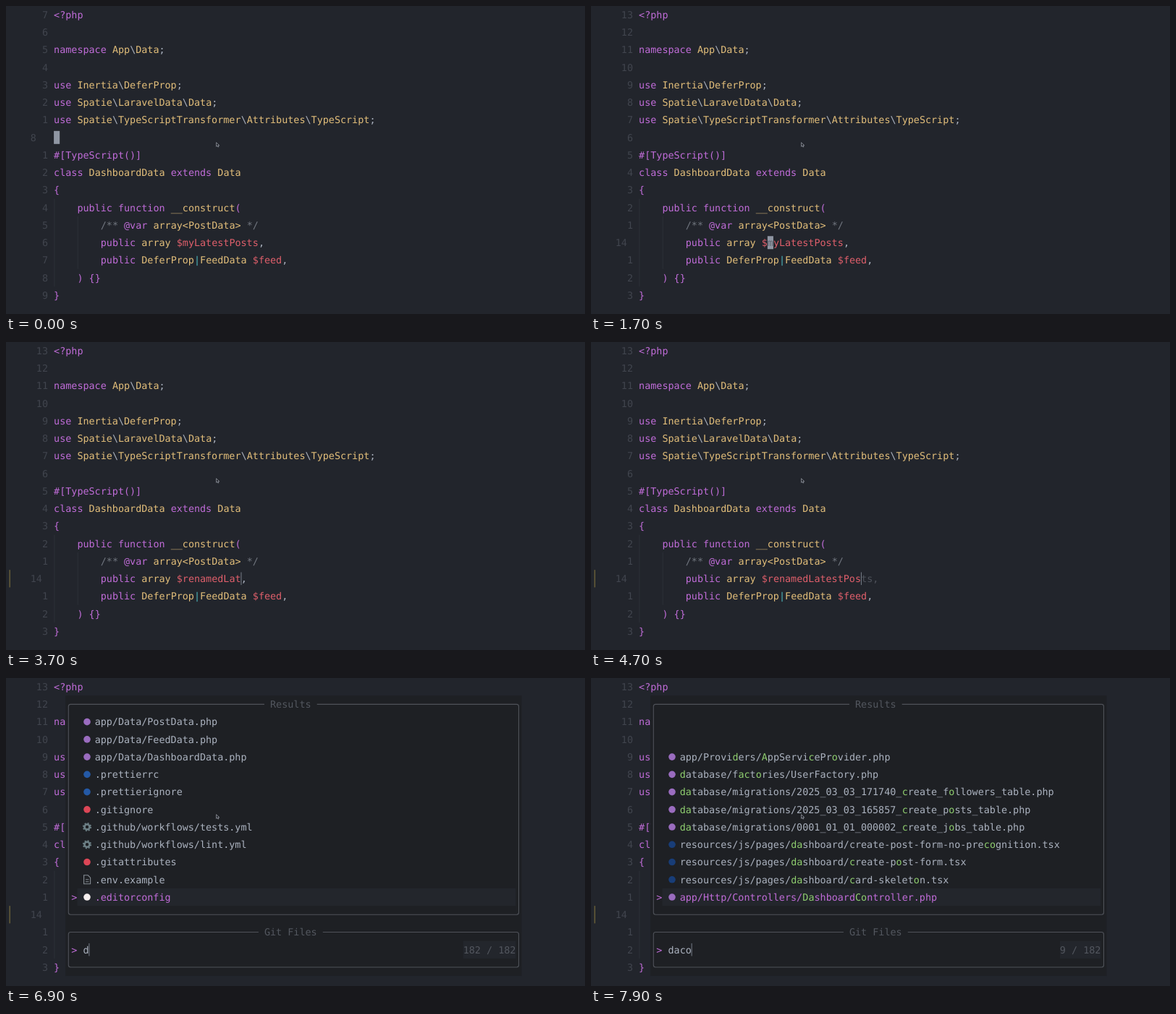
These frames come from a looping animation (800x426 px, 8000 ms). An HTML page:

```html
<!DOCTYPE html>
<html lang="en">
<head>
<meta charset="utf-8">
<title>Renaming a property</title>
<style>
  html, body { margin: 0; width: 100%; height: 100%; overflow: hidden; background: #22252c; }
  svg { display: block; width: 800px; height: 426px; }
  text {
    font: 13.42px "DejaVu Sans Mono", "Noto Sans Mono", monospace;
    white-space: pre;
    text-rendering: geometricPrecision;
  }
</style>
</head>
<body>
<svg id="stage" viewBox="0 0 800 426"></svg>
<script>
const LOOP = 8000, CW = 8.08, RH = 24.24, LEFT = 66.1, MID = 12.15;
const C = {
  p: '#c06cd8', y: '#e2be7a', w: '#abb2bf', r: '#df5f6b', g: '#71767f', c: '#4db5bd',
  num: '#41454e', ghost: '#4e525b', block: '#8f96a3', under: '#5d626d',
  guide: '#2d3138', pop: '#1e2024', sel: '#23262c', line: '#4f5259', title: '#53575f', hit: '#8fce6f'
};

// Each line: indent, then colour/text pairs
const CODE = [
  [0, 'p', '<?php'],
  [0],
  [0, 'p', 'namespace ', 'y', 'App', 'w', '\\', 'y', 'Data', 'w', ';'],
  [0],
  [0, 'p', 'use ', 'y', 'Inertia', 'w', '\\', 'y', 'DeferProp', 'w', ';'],
  [0, 'p', 'use ', 'y', 'Spatie', 'w', '\\', 'y', 'LaravelData', 'w', '\\', 'y', 'Data', 'w', ';'],
  [0, 'p', 'use ', 'y', 'Spatie', 'w', '\\', 'y', 'TypeScriptTransformer', 'w', '\\',
    'y', 'Attributes', 'w', '\\', 'y', 'TypeScript', 'w', ';'],
  [0],
  [0, 'p', '#[TypeScript()]'],
  [0, 'p', 'class ', 'y', 'DashboardData ', 'p', 'extends ', 'y', 'Data'],
  [0, 'p', '{'],
  [4, 'p', 'public function ', 'y', '__construct', 'p', '('],
  [8, 'g', '/** ', 'p', '@var ', 'y', 'array<PostData> ', 'g', '*/'],
  null,
  [8, 'p', 'public ', 'y', 'DeferProp', 'c', '|', 'y', 'FeedData ', 'r', '$feed', 'w', ','],
  [4, 'p', ') {}'],
  [0, 'p', '}']
];
const EDIT_ROW = 13, NAME_COL = 22;
const OLD_NAME = 'myLatestPosts', NEW_NAME = 'renamedLatestPosts';

// Time, row, column of the block cursor before the edit
const MOVES = [[0, 7, 0], [500, 13, 0], [1000, 13, 8], [1200, 13, 15], [1400, 13, 21], [1600, 13, 22]];
const T = { cut: 2000, sign: 2300, type: 2130, key: 155, ghost: 4650, esc: 5200, blame: 5700, popup: 6500, filter: 7300 };
const QUERY = [[6800, 'd'], [7100, 'da'], [7300, 'dac'], [7500, 'daco']];

// Icon and path; brackets mark matched letters
const ALL_FILES = [
  ['php', 'app/Data/PostData.php'], ['php', 'app/Data/FeedData.php'], ['php', 'app/Data/DashboardData.php'],
  ['fmt', '.prettierrc'], ['fmt', '.prettierignore'], ['git', '.gitignore'],
  ['gear', '.github/workflows/tests.yml'], ['gear', '.github/workflows/lint.yml'],
  ['git', '.gitattributes'], ['doc', '.env.example'], ['cfg', '.editorconfig']
];
const FOUND = [
  ['php', 'app/Provi[d]ers/[A]ppServi[c]ePr[o]vider.php'],
  ['php', '[d]atabase/f[ac]t[o]ries/UserFactory.php'],
  ['php', '[da]tabase/migrations/2025_03_03_171740_[c]reate_f[o]llowers_table.php'],
  ['php', '[da]tabase/migrations/2025_03_03_165857_[c]reate_p[o]sts_table.php'],
  ['php', '[da]tabase/migrations/0001_01_01_000002_[c]reate_j[o]bs_table.php'],
  ['tsx', 'resources/js/pages/[da]shboard/create-post-form-no-pre[co]gnition.tsx'],
  ['tsx', 'resources/js/pages/[da]shboard/[c]reate-p[o]st-form.tsx'],
  ['tsx', 'resources/js/pages/[da]shboard/[c]ard-skelet[o]n.tsx'],
  ['php', 'app/Http/Controllers/[Da]shboard[Co]ntroller.php']
];
const DOTS = { php: '#9a6cbf', fmt: '#2459a6', git: '#dc4656', cfg: '#f5eeee', tsx: '#183d78' };

const X = col => LEFT + col * CW;
const Y = row => MID + row * RH;
const esc = s => s.replace(/&/g, '&amp;').replace(/</g, '&lt;').replace(/>/g, '&gt;');
const rect = (x, y, w, h, fill) => `<rect x="${x}" y="${y}" width="${w}" height="${h}" fill="${fill}"/>`;
const path = (d, stroke, width = 1.1) => `<path d="${d}" fill="none" stroke="${stroke}" stroke-width="${width}"/>`;
const last = (table, t) => table.filter(e => e[0] <= t).pop();

// Words are placed one by one on the character grid
function write(row, col, str, color) {
  let out = '';
  for (const m of str.matchAll(/\S+/g))
    out += `<text x="${X(col + m.index).toFixed(2)}" y="${(Y(row) + 4.8).toFixed(2)}" fill="${color}">${esc(m[0])}</text>`;
  return out;
}

function writeRuns(row, [col, ...runs]) {
  let out = '';
  for (let i = 0; i < runs.length; i += 2) {
    out += write(row, col, runs[i + 1], C[runs[i]]);
    col += runs[i + 1].length;
  }
  return out;
}

const block = (row, col) => rect(X(col), Y(row) - 9, CW, 18, C.block);
const bar = (row, col) => rect(X(col) - 0.2, Y(row) - 8.8, 1, 17.6, '#777d88');

function editLine(s) {
  const head = [8, 'p', 'public ', 'y', 'array ', 'r', '$' + s.name];
  const end = NAME_COL + s.name.length;
  let out = writeRuns(EDIT_ROW, head);
  out += s.ghost ? write(EDIT_ROW, end, NEW_NAME.slice(s.name.length) + ',', C.ghost)
                 : write(EDIT_ROW, end, ',', C.w);
  if (s.blame) out += write(EDIT_ROW, 43, 'Not Committed Yet', C.ghost);
  return out;
}

function editor(s) {
  let out = path(`M${X(0) + .8} ${Y(10.5)}V${Y(15.5)}M${X(4) + .8} ${Y(11.5)}V${Y(14.5)}`, C.guide, 1);
  CODE.forEach((line, row) => {
    const n = Math.abs(row - s.row);
    const label = String(n || row + 1);
    out += write(row, n ? -1 - label.length : -4, label, C.num);
    out += line ? writeRuns(row, line) : editLine(s);
  });
  if (s.sign) out += rect(4.6, Y(12.5), 1.1, RH, '#80713c');
  if (s.insert) return out + bar(s.row, s.col);
  out += block(s.row, s.col);
  const text = '        public array $' + s.name;
  if (s.row === EDIT_ROW) out += write(s.row, s.col, text[s.col] || ' ', C.under);
  return out;
}

function icon(kind, row) {
  const x = 112, y = Y(row);
  if (DOTS[kind]) return `<circle cx="${x}" cy="${y}" r="4.8" fill="${DOTS[kind]}"/>`;
  if (kind === 'gear')
    return `<circle cx="${x}" cy="${y}" r="3.5" fill="none" stroke="#6d8086" stroke-width="2.6"/>` +
      `<circle cx="${x}" cy="${y}" r="5.2" fill="none" stroke="#6d8086" stroke-width="1.8" stroke-dasharray="2.04"/>`;
  return path(`M${x - 4.4} ${y - 6}h5.6l3.4 3.4v8.6h-9zM${x - 2} ${y}h4.4M${x - 2} ${y + 3}h4.4`, '#858b93');
}

function frame(top, bottom, title, col) {
  const l = X(2.5), r = X(79.5), t = Y(top), b = Y(bottom), q = 3;
  return path(`M${X(col - 1)} ${t}H${l + q}q${-q} 0 ${-q} ${q}V${b - q}q0 ${q} ${q} ${q}H${r - q}` +
    `q${q} 0 ${q} ${-q}V${t + q}q0 ${-q} ${-q} ${-q}H${X(col + title.length + 1)}`, C.line) +
    write(top, col, title, C.title);
}

function fileRow([kind, marked], row) {
  const base = row === 12 ? C.p : C.w;
  let col = 7, out = icon(kind, row);
  marked.split(/[\[\]]/).forEach((part, i) => {
    out += write(row, col, part, i % 2 ? C.hit : base);
    col += part.length;
  });
  return out;
}

function popup(s) {
  const files = s.filtered ? FOUND : ALL_FILES;
  const count = (s.filtered ? '9' : '182') + ' / 182';
  return rect(X(2), Y(.5), 78 * CW, 16 * RH, C.pop) +
    rect(X(4), Y(11.5), 75 * CW, RH, C.sel) +
    rect(X(79 - count.length), Y(14.5), count.length * CW, RH, C.sel) +
    frame(1, 13, 'Results', 37) + frame(14, 16, 'Git Files', 36) +
    files.map((f, i) => fileRow(f, 13 - files.length + i)).join('') +
    write(12, 3, '>', C.p) + write(15, 3, '>', C.p) +
    write(15, 5, s.query, C.w) + bar(15, 5 + s.query.length) +
    write(15, 79 - count.length, count, C.title);
}

const pointer = `<path d="M290.6 188.8v5.6l1.4-1.2 .9 1.9 1-.5-.8-1.8h1.7z" fill="#202329" stroke="#a5aab3" stroke-width=".7"/>`;

function stateAt(t) {
  let [, row, col] = last(MOVES, t);
  const cut = t >= T.cut;
  const typed = Math.max(0, Math.min(NEW_NAME.length, Math.floor((t - T.type) / T.key)));
  const name = cut ? NEW_NAME.slice(0, typed) : OLD_NAME;
  const insert = cut && t < T.esc;
  if (cut) col = NAME_COL + typed - (insert ? 0 : 1);
  return {
    row, col, name, insert,
    sign: t >= T.sign,
    ghost: t >= T.ghost && typed < NEW_NAME.length,
    blame: t >= T.blame,
    open: t >= T.popup,
    filtered: t >= T.filter,
    query: (last(QUERY, t) || [0, ''])[1]
  };
}

const stage = document.getElementById('stage');
let shown = '';
function draw() {
  const s = stateAt(performance.now() % LOOP);
  const key = JSON.stringify(s);
  if (key !== shown) {
    stage.innerHTML = editor(s) + (s.open ? popup(s) : '') + pointer;
    shown = key;
  }
  requestAnimationFrame(draw);
}
draw();
</script>
</body>
</html>
```
